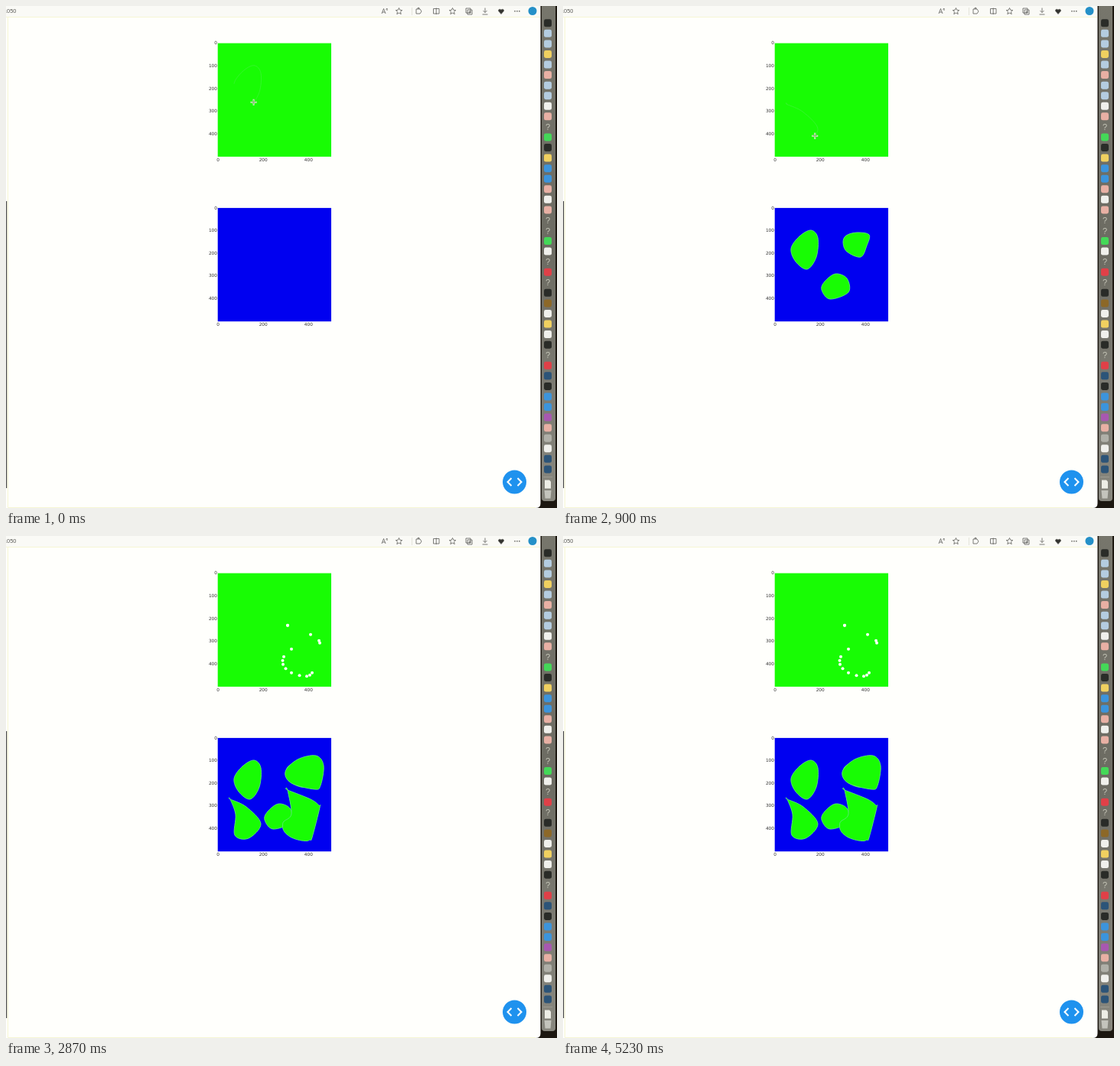
Write an HTML page that moves like this. It is 720 by 656 pixels and loops after 5.26 s.

```html
<!DOCTYPE html>
<html lang="en">
<head>
<meta charset="utf-8">
<title>Mask drawing</title>
<style>
  html, body { margin: 0; width: 100%; height: 100%; overflow: hidden; background: #fffffc; }
  svg { display: block; }
  text { font-family: "Liberation Sans", Arial, sans-serif; }
  .axis text { font: 5.8px "DejaVu Sans", sans-serif; fill: #333; }
  .axis .y { text-anchor: end; }
  .axis .x { text-anchor: middle; }
  .icons, .modebar { fill: none; stroke: #5c5c58; stroke-width: .8; }
  .modebar { stroke: #c4c4b8; }
  .mask { fill: #18fc04; stroke: #5ce878; stroke-width: .9; }
  .tip text { font-size: 6.3px; fill: #fff; }
  .dock text { font-size: 11px; fill: #c6c6b8; text-anchor: middle; }
</style>
</head>
<body>
<svg width="720" height="656" viewBox="0 0 720 656">
  <defs>
    <linearGradient id="panel" x1="0" y1="0" x2="0" y2="1">
      <stop offset="0" stop-color="#77766c"/>
      <stop offset=".5" stop-color="#6c6b62"/>
      <stop offset="1" stop-color="#88877e"/>
    </linearGradient>
  </defs>

  <!-- desktop and browser window -->
  <rect width="720" height="656" fill="#1c1710"/>
  <path d="M0 0H698.5V650Q698.5 656 692 656H0Z" fill="#fffffc"/>
  <rect width="698" height="14" fill="#fafaf6"/>
  <path d="M0 14.5H698M2.5 15V655.5H692" fill="none" stroke="#f6f6d4"/>
  <rect y="255" width="1.2" height="375" fill="#4c4c48"/>
  <text x="-3" y="9.2" font-size="7.4" fill="#5c5c58">1050</text>

  <g class="icons">
    <path d="M491 10L493.5 3.5L496 10M492 8H495M496.5 4.5L498 3V6"/>
    <path id="star" d="M513.5 2.5L514.8 5.3L517.7 5.6L515.5 7.6L516.2 10.6L513.5 9L510.8 10.6L511.5 7.6L509.3 5.6L512.2 5.3Z"/>
    <path d="M530.5 2V12" stroke="#ddddd4"/>
    <path d="M536 4H541L543 7L541 10H536ZM538 4V2.5H540V4"/>
    <path d="M558.5 3.5H566V10H558.5ZM562.2 2.5V11"/>
    <use href="#star" x="70"/>
    <path d="M601 3H607V9H601ZM603 5H609V11H603ZM606 6.5V9.5M604.5 8H607.5"/>
    <path d="M626 2.5V8.5M623.5 6L626 8.5L628.5 6M622.5 11H629.5"/>
    <path d="M647 10.5L643.5 6.5Q643.5 3 647 5Q650.5 3 650.5 6.5Z" fill="#33332f"/>
    <path d="M664.3 6.8H671.5" stroke-width="1.4" stroke-dasharray="1.4 1.5"/>
  </g>
  <circle cx="688" cy="6.5" r="5.5" fill="#2590c8"/>

  <g id="plots"></g>
  <g id="masks"></g>
  <path id="trace" transform="translate(0 -215.3)" pathLength="1" fill="none" stroke="#3cf434" stroke-width=".8"/>
  <g id="handles" fill="#fff" data-on="1540"></g>

  <g class="modebar" data-on="1535" data-off="1750">
    <path d="M590.5 23.5H592.5L593 22.5H595L595.5 23.5H597.5V28H590.5Z"/>
    <path d="M605 23H610V27H605ZM608 28H612V25"/>
    <path d="M621.5 22V29M618 25.5H625"/>
    <path d="M633 22.5H639V28.5H633ZM636 23.5V27.5M634 25.5H638"/>
    <path d="M644.5 22.5H650.5V28.5H644.5ZM645.5 25.5H649.5"/>
    <path d="M656 23L662 28M662 23L656 28M657.5 25.5H660.5"/>
    <path d="M667.5 25.5L671 22.5L674.5 25.5M668.5 25V28.5H673.5V25"/>
    <rect x="682" y="21.5" width="8.5" height="8" fill="#44443f" stroke="none"/>
  </g>

  <g class="tip" data-on="1540" data-off="1640">
    <path d="M348 91.5H396V118H348V107L345 104L348 101Z" stroke="#f4f4dc" stroke-width=".7"/>
    <text x="349.4" y="98.6">x: 230</text>
    <text x="349.4" y="106.8">y: 186</text>
    <text x="349.4" y="115">color: [0, 255, 0]</text>
  </g>

  <g id="cursor" data-off="1640">
    <path d="M-4 0H4M0 -4V4" stroke="#e4f4d4" stroke-width="2"/>
    <path d="M-3 0H3M0 -3V3" stroke="#70a060" stroke-width=".8"/>
  </g>

  <circle cx="664.5" cy="622" r="15.5" fill="#1f92ee"/>
  <path d="M660.5 617L655.5 622L660.5 627M668.5 617L673.5 622L668.5 627" fill="none" stroke="#fff" stroke-width="2"/>

  <g class="dock" id="dock">
    <rect x="700" y="-8" width="18" height="655" rx="4" fill="url(#panel)"/>
    <path d="M702 615.5H714" stroke="#a5a49a" stroke-width=".7"/>
    <path d="M704 619.5H710L712 621.5V630.5H704Z" fill="#eeeee6"/>
    <path d="M703.5 633H712.5L711.5 643.5H704.5Z" fill="#c4c4bc"/>
  </g>
</svg>

<script>
const LOOP = 5260;
const DROP = 215.3; // distance from the drawing plot to the mask plot
const $ = id => document.getElementById(id);

function add(parent, tag, attrs, text = '') {
  const el = document.createElementNS('http://www.w3.org/2000/svg', tag);
  for (const key in attrs) el.setAttribute(key, attrs[key]);
  el.textContent = text;
  return parent.appendChild(el);
}

// Image plot: 500 data units across 148 px
function plot(top, fill) {
  const g = add($('plots'), 'g', { class: 'axis' });
  add(g, 'rect', { x: 276.7, y: top, width: 148.3, height: 148.3, fill });
  for (let v = 0; v < 500; v += 100) {
    const d = v * 148 / 500;
    add(g, 'text', { class: 'y', x: 276, y: top + d + 1.7 }, v);
    if (v % 200 === 0) add(g, 'text', { class: 'x', x: 277 + d, y: top + 154.5 }, v);
  }
}
plot(48.6, '#18fc04');
plot(48.6 + DROP, '#0000f0');

// Smooth closed curve through the points; a doubled point makes a corner
function outline(pts) {
  const at = i => pts[(i + pts.length) % pts.length];
  const lean = (p, a, b, k) => p.map((v, n) => v + (b[n] - a[n]) * k / 6);
  return 'M' + pts[0] + pts.map((p, i) => {
    const q = at(i + 1);
    return 'C' + [lean(p, at(i - 1), q, 1), lean(q, p, at(i + 2), -1), q].join(' ');
  }).join('') + 'Z';
}

// Freehand strokes: drawing time and key points, clockwise
const strokes = [
  [-190, 90, '298,317 309,301 324,293 333,303 331,328 319,344 304,334'],
  [200, 490, '366,309 370,300 384,296 400,299 397,313 389,328 371,321'],
  [540, 710, '356,350 371,356 373,374 349,383 338,371 342,360'],
  [780, 1050, '293,344 293,344 314,354 333,376 317,395 299,391 300,364'],
  [1110, 1330, '365,308 381,292 405,287 415,300 411,326 403,331 373,323'],
  [1350, 1530, `368,332 368,332 398,344 409,352 410,355 400,394 397,397 393,398.5
    383.5,397.5 373,394 365.5,388.5 362,383 361.5,378 363,373 373,363`]
].map(([from, to, text]) => {
  const pts = text.split(/\s+/).map(p => p.split(',').map(Number));
  const path = add($('masks'), 'path', { class: 'mask', d: outline(pts), 'data-on': to });
  const size = path.getTotalLength();
  const point = k => {
    const { x, y } = path.getPointAtLength(size * k);
    return [x, y - DROP];
  };
  return { from, to, pts, path, point };
});

// The last outline stays selected and shows its handles
const last = strokes[strokes.length - 1];
for (const [cx, y] of last.pts) add($('handles'), 'circle', { cx, cy: y - DROP, r: 2 });

// Dock: one letter per icon, "?" for a missing one
const colours = {
  k: '#2a2c28', w: '#f0f0ec', n: '#b4cce0', b: '#3c94dc', d: '#2c5478', g: '#44d858',
  r: '#e04048', e: '#e8b0a4', o: '#8c6828', y: '#f0d060', p: '#a858b0', s: '#b0b0a8'
};
[...'knnynennwe?gkybbewe??gw?r?kowywk?rdkbbpeswdd'].forEach((key, i) => {
  const y = 22.3 + i * 13.56;
  if (key === '?') add($('dock'), 'text', { x: 708, y: y + 4 }, key);
  else add($('dock'), 'rect', { x: 703, y: y - 5, width: 10, height: 10, rx: 2.4, fill: colours[key] });
});

function glide(a, b, k) {
  const e = Math.min(k, 1);
  return a.map((v, n) => v + (b[n] - v) * e * e * (3 - 2 * e));
}

function pointerAt(t) {
  const i = strokes.findIndex(s => t < s.to);
  if (i < 0) return glide(last.point(0), [377, 44], (t - last.to) / 40);
  const { from, to, point } = strokes[i];
  if (t >= from) return point((t - from) / (to - from));
  const prev = strokes[i - 1];
  return glide(prev.point(1), point(0), (t - prev.to) / (from - prev.to));
}

function drawTrace(t) {
  const s = strokes.find(s => t >= s.from && t < s.to);
  $('trace').style.visibility = s ? 'visible' : 'hidden';
  if (!s) return;
  $('trace').setAttribute('d', s.path.getAttribute('d'));
  $('trace').setAttribute('stroke-dasharray', `${(t - s.from) / (s.to - s.from)} 2`);
}

const timed = [...document.querySelectorAll('[data-on], [data-off]')].map(el => ({
  el, on: +(el.dataset.on || 0), off: +(el.dataset.off || LOOP)
}));

const start = performance.now();
function draw() {
  const t = (performance.now() - start) % LOOP;
  for (const { el, on, off } of timed) {
    el.style.visibility = t >= on && t < off ? 'visible' : 'hidden';
  }
  $('cursor').setAttribute('transform', `translate(${pointerAt(t)})`);
  drawTrace(t);
  requestAnimationFrame(draw);
}
draw();
</script>
</body>
</html>
```
